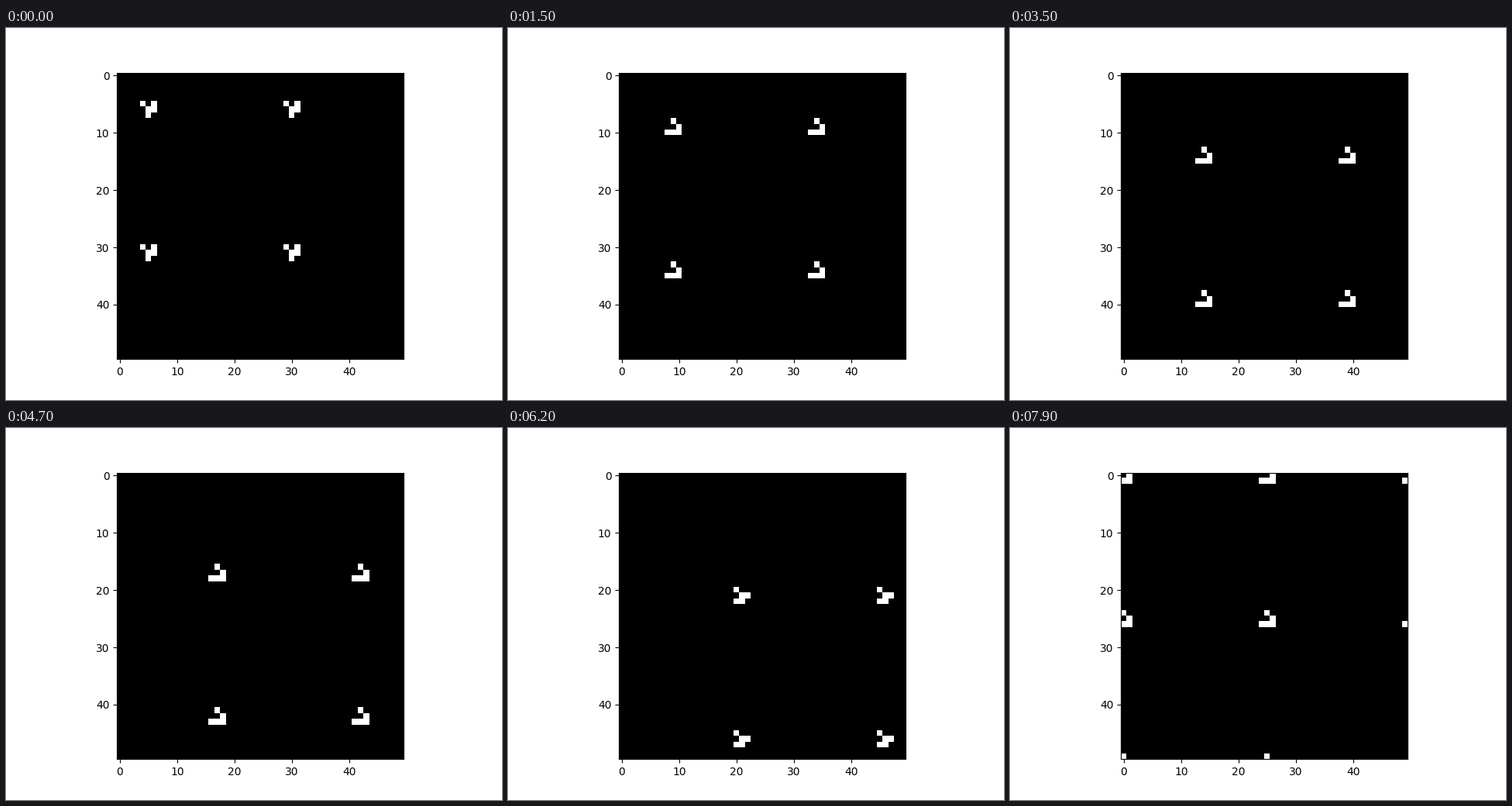
Recreate the animation shown at these times as a matplotlib script. Size 640 by 480 pixels, loop 8000 ms.

```python
import numpy as np
import matplotlib.pyplot as plt
from matplotlib.animation import FuncAnimation

SIZE = 50
FRAMES = 80
GLIDER = np.array([[0, 1, 0],
                   [0, 0, 1],
                   [1, 1, 1]])


def step(grid):
    """One Game of Life generation on a torus."""
    shifts = [(dy, dx) for dy in (-1, 0, 1) for dx in (-1, 0, 1) if dy or dx]
    neighbours = sum(np.roll(grid, s, axis=(0, 1)) for s in shifts)
    return ((neighbours == 3) | ((grid == 1) & (neighbours == 2))).astype(int)


def seed():
    grid = np.zeros((SIZE, SIZE), dtype=int)
    for y in (4, 29):
        for x in (4, 29):
            grid[y:y + 3, x:x + 3] = GLIDER
    return grid


generations = [step(seed())]
while len(generations) < FRAMES:
    generations.append(step(generations[-1]))

fig, ax = plt.subplots(figsize=(6.4, 4.8), dpi=100)
image = ax.imshow(generations[0], cmap="gray", vmin=0, vmax=1,
                  interpolation="nearest")


def update(i):
    image.set_data(generations[i])
    return [image]


anim = FuncAnimation(fig, update, frames=FRAMES, interval=100, repeat=True)
plt.show()
```
